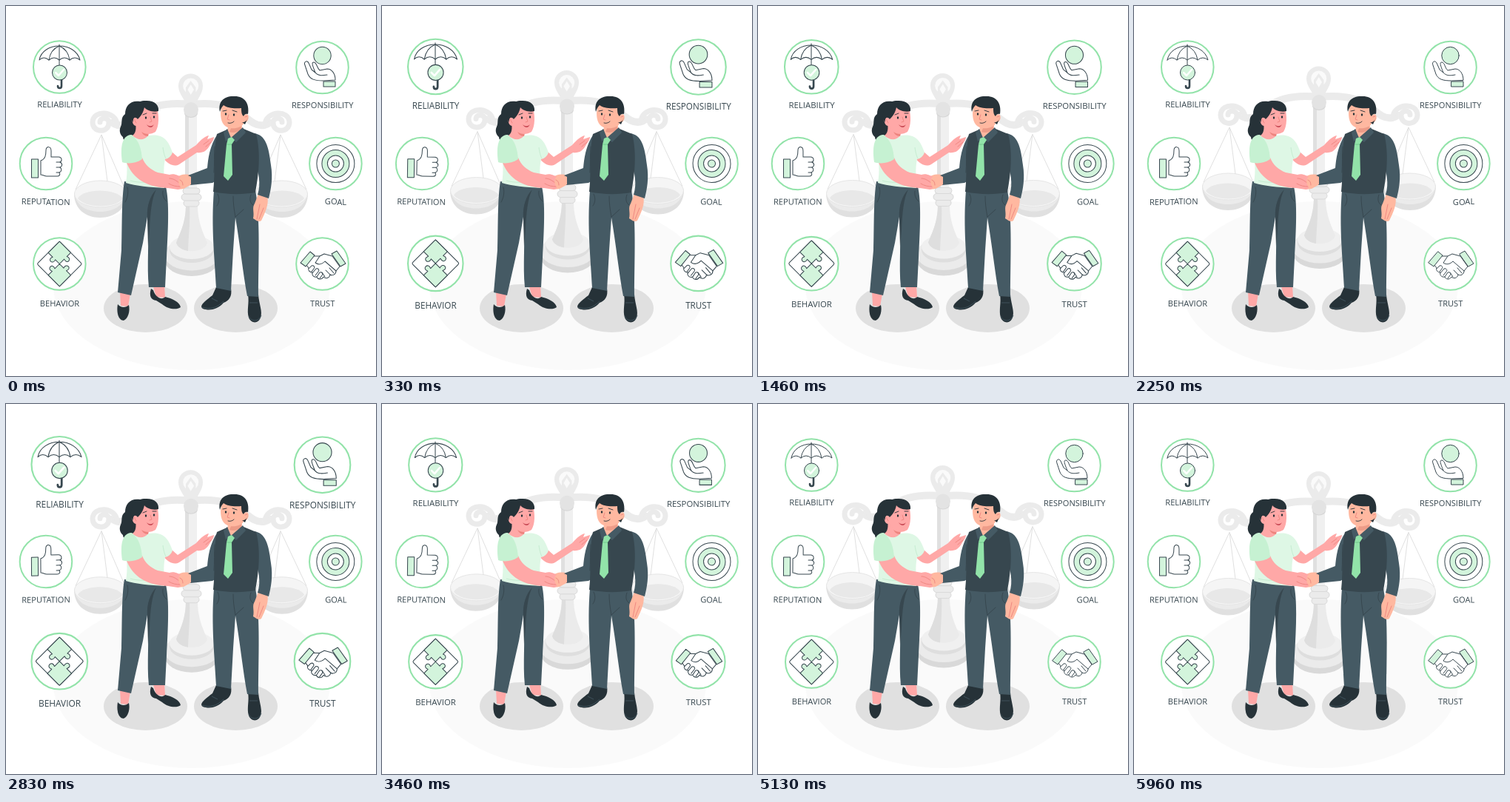
Write an HTML page that moves like this. It is 500 px wide and 500 px high and loops after 6 s.

```html
<!DOCTYPE html>
<html lang="en">
<head>
<meta charset="utf-8">
<title>Trust and values</title>
<style>
  html, body { margin: 0; width: 100%; height: 100%; overflow: hidden; background: #fff; }
  svg { display: block; width: 100%; height: 100%; }
  text { font: 11.1px "Open Sans", "Noto Sans", sans-serif; fill: #37474f; text-anchor: middle; }
  .ring { fill: #fff; stroke: #92e3a9; stroke-width: 2; }
  .icon { fill: none; stroke: #37474f; stroke-width: 1; stroke-linecap: round; stroke-linejoin: round; }
  .tint { fill: #d3f4dc; }
  .white { fill: #fff; }
  .dark { fill: #263238; }
  .slate { fill: #455a64; }
  .deep { fill: #37474f; }
  .rose { fill: #ffa8a7; }
  .peach { fill: #ffb8a0; }
  .line { fill: none; stroke: #263238; stroke-width: .9; stroke-linecap: round; }
  .fold { fill: none; stroke: #37474f; stroke-width: 1; stroke-linecap: round; }
  .blush { fill: none; stroke: #ed847e; stroke-width: .9; stroke-linecap: round; }
</style>
</head>
<body>
<svg viewBox="0 0 500 500" xmlns="http://www.w3.org/2000/svg">
  <defs>
    <g id="arm">
      <path d="M250 133C222 130 198 134 183 145C170 155 163 163 151 161C146 160 143 157 142 153" fill="none" stroke="#ebebeb" stroke-width="10"/>
      <path d="M150 160C149 142 118 139 117 157C117 172 139 172 139 158C139 150 127 150 127 157" fill="none" stroke="#ebebeb" stroke-width="7" stroke-linecap="round"/>
      <path d="M92 253C92 274 107 286 127 286S163 274 163 253Z" fill="#e0e0e0"/>
      <path d="M92 252C94 269 108 278 127 278S160 269 163 252Z" fill="#ebebeb"/>
      <ellipse cx="127.5" cy="254" rx="35" ry="18" fill="#f5f5f5" stroke="#e6e6e6"/>
      <path d="M97 260C105 246 148 246 158 260C148 274 108 274 97 260Z" fill="#e8e8e8"/>
      <path d="M94 248L129 174L161 248M129 174L137 237" fill="none" stroke="#e0e0e0"/>
    </g>
  </defs>

  <ellipse cx="251" cy="378" rx="187" ry="114" fill="#fafafa"/>

  <g id="scales">
    <use href="#arm"/>
    <use href="#arm" transform="matrix(-1 0 0 1 500 0)"/>
    <path d="M243 137C244 126 233 121 233 107.5A16.5 16 0 0 1 266 107.5C266 121 256 126 257 137Z" fill="#ebebeb"/>
    <circle cx="249.7" cy="108" r="10.5" fill="#fafafa"/>
    <path d="M243 128L243 110L249.7 101L256.5 110V128Z" fill="#ebebeb"/>
    <path d="M249.7 106L254 113L249.7 120L245.500 113Z" fill="#fafafa"/>
    <path d="M214 342.500A37 22.500 0 0 0 288 342.500V336H214Z" fill="#d9d9d9"/>
    <ellipse cx="251" cy="336" rx="37" ry="21.500" fill="#ebebeb"/>
    <ellipse cx="251" cy="330" rx="30" ry="17" fill="#dedede"/>
    <ellipse cx="251" cy="326" rx="30" ry="16" fill="#f0f0f0"/>
    <path d="M243 268C243 291 237 303 230 320C234 335 268 335 272 320C265 303 259 291 259 268Z" fill="#ebebeb"/>
    <path d="M243 268C243 291 237 303 230 320C232 327 240 330 246 331C247 306 249 290 248 268Z" fill="#dedede"/>
    <path d="M242 144H258V248H242Z" fill="#f0f0f0"/>
    <path d="M242 144H247V248H242Z" fill="#e0e0e0"/>
    <g fill="#ebebeb" stroke="#d9d9d9">
      <rect x="240" y="262" width="21" height="9" rx="4.500"/>
      <rect x="237" y="254" width="27" height="9" rx="4.500"/>
      <rect x="239" y="246" width="23" height="8" rx="4"/>
    </g>
    <ellipse cx="250" cy="145" rx="9" ry="6" fill="#d6d6d6"/>
    <circle cx="250" cy="140" r="10" fill="#e3e3e3"/>
  </g>

  <g fill="#e0e0e0">
    <ellipse cx="188.500" cy="408.500" rx="56.500" ry="32.500"/>
    <ellipse cx="310.500" cy="408.500" rx="56.500" ry="32.500"/>
  </g>

  <g id="man">
    <path class="dark" d="M284 380L304 382C306 392 301 399 294 401C285 411 274 412 266 409C260 405 270 398 279 391Z"/>
    <path class="dark" d="M327 390H341C342 403 347 413 344 421C341 430 331 429 328 421C325 411 329 402 327 390Z"/>
    <path d="M265 407C275 411 285 408 294 399M328 419C331 427 342 427 345 418M278 395L286 399M329 401H340" fill="none" stroke="#455a64" stroke-width=".8"/>
    <path class="slate" d="M281 249H337C344 290 341 340 341 393L326 392C320 360 316 320 310 286L307 330L304 385L284 381C282 340 277 300 281 249Z"/>
    <path class="fold" d="M310 285C308 274 307 266 307 257M310 285L321 275M286 254C289 260 288 266 285 270M331 255C328 263 331 268 336 270"/>
    <path class="peach" d="M341 254L353 257C356 267 350 280 345 290C341 293 336 288 334 287C336 279 332 273 336 267Z"/>
    <path class="blush" d="M343 268L339 288M348 273L342 288"/>
    <path class="slate" d="M335 172C351 174 355 190 358 215C361 233 358 248 355 260L340 255C345 240 341 225 337 209Z"/>
    <path class="peach" d="M250 229C242 226 235 228 230 232L223 240C226 246 232 249 239 247L251 241Z"/>
    <path class="slate" d="M286 173C275 189 273 207 272 219L246 229C247 234 248 239 249 242L279 239C285 238 287 219 287 205Z"/>
    <path class="deep" d="M285 173L301 166H321L338 173C345 200 341 230 337 252C319 255 299 255 280 251C283 225 280 195 285 173Z"/>
    <path class="fold" stroke="#263238" d="M337 186C337 195 338 203 340 211M282 190C281 201 282 214 281 225"/>
    <path class="peach" d="M301 155H319V169L304 180L299 171Z"/>
    <path d="M304 165C310 164 314 161 317 157L318 166C313 171 307 172 302 170Z" fill="#ed9c88"/>
    <path class="slate" d="M299 166L304 178L297 183L294 171ZM320 164L324 171L311 184L304 178Z"/>
    <path d="M300 179L305 177L309 181L305 187L306 228L300 236L294 230L298 187Z" fill="#92e3a9"/>
    <path d="M298 187L305 187" stroke="#6fc489" stroke-width=".9"/>
    <path class="peach" d="M292 133L320 135L323 147C329 143 330 157 322 158C318 164 311 166 303 165C293 163 290 155 290 144Z"/>
    <path class="dark" d="M289 143C286 129 295 121 309 122C323 122 329 132 327 146C325 145 322 146 321 149C318 147 318 141 318 138C309 139 299 138 294 134C291 137 290 140 289 143Z"/>
    <path class="dark" d="M319 157C323 158 326 154 327 150L323 160Z"/>
    <g class="dark"><ellipse cx="297" cy="146" rx="1.200" ry="1.700"/><ellipse cx="308" cy="147" rx="1.200" ry="1.700"/></g>
    <path class="line" d="M293 142L298 141M306 141L312 143"/>
    <path class="blush" d="M301 147L299 153L302 154M323 150L326 149"/>
    <path class="line" d="M300 158C303 159 306 158 308 156"/>
  </g>

  <g id="woman">
    <path class="dark" d="M181 129C168 127 161 135 161 146C154 151 158 158 155 163C152 169 155 175 158 177C158 183 166 186 172 183C180 181 182 172 178 165L185 142Z"/>
    <path class="rose" d="M154 386L168 389L165 406L155 405ZM198 376H214L215 394L203 393Z"/>
    <path class="dark" d="M151 403C155 408 162 408 166 404C168 412 165 423 159 425C152 425 149 414 151 403Z"/>
    <path class="dark" d="M196 382C193 392 196 397 203 398L211 403C219 410 231 411 236 407C235 400 224 395 215 393C211 398 202 394 199 384Z"/>
    <path class="slate" d="M160 237L216 244C221 265 219 304 217 340L215 380L193 380C190 350 194 320 191 285L185 320L169 391L151 387L156 330C157 300 156 260 160 237Z"/>
    <path class="deep" d="M191 285C190 270 195 256 203 248C197 260 195 278 194 303L192 325Z"/>
    <path class="fold" d="M164 245C166 252 164 260 161 265M212 250C211 257 214 261 217 264"/>
    <path class="rose" d="M212 205L224 197L232 204L257 188C263 181 269 176 274 175L272 180L281 177C281 181 278 184 275 189C271 196 266 199 258 198L234 214C227 218 219 214 212 205Z"/>
    <path class="blush" d="M274 182L267 187M277 184L270 190"/>
    <path d="M169 174C182 179 195 173 205 175C216 177 221 186 225 198C223 203 220 206 215 207C212 220 214 235 214 246C195 245 175 243 162 239C165 222 163 209 161 193Z" fill="#def7e5"/>
    <path d="M212 191C213 198 214 202 216 206M168 236C178 239 192 239 201 236" fill="none" stroke="#c5ecd1"/>
    <path class="rose" d="M162 209L184 205C188 215 195 221 205 225L221 228C227 226 234 229 239 233L244 239C240 242 237 240 233 239C238 243 237 248 232 248L219 246C194 245 171 236 162 209Z"/>
    <path class="blush" d="M221 233C226 233 230 236 234 239M220 240C225 243 230 244 235 244"/>
    <path class="peach" d="M234 233C239 227 245 228 250 231V241L240 247C234 245 232 239 234 233Z"/>
    <path class="blush" d="M235 235C238 236 239 239 239 242"/>
    <path d="M169 174C157 175 154 190 157 211C166 214 177 212 184 207C183 194 180 181 169 174Z" fill="#c6f1d2"/>
    <path class="rose" d="M175 157L193 164L192 175C186 183 177 181 171 175C176 171 176 165 175 157Z"/>
    <path d="M183 169L193 172L192 176C187 176 184 173 183 169Z" fill="#ed847e"/>
    <path class="rose" d="M178 137H204C207 149 207 162 202 170C196 174 188 174 183 170L179 162C170 164 168 151 175 150Z"/>
    <path class="dark" d="M169 150C168 134 179 127 190 128C201 128 207 134 206 142C199 144 190 141 187 137C185 146 181 150 178 153C175 149 171 150 172 158Z"/>
    <g class="dark"><ellipse cx="189" cy="151" rx="1.200" ry="1.700"/><ellipse cx="200" cy="150" rx="1.200" ry="1.700"/></g>
    <path class="line" d="M185 147L190 145M198 145L203 145"/>
    <path class="blush" d="M195 150L197 156L194 157M173 153L176 158"/>
    <path d="M190 160C193 163 197 163 200 160L198 163C196 165 192 164 190 160Z" fill="#c94b55"/>
  </g>

  <g class="pulse" data-pivot="72.3 91.5">
    <circle class="ring" cx="72.300" cy="82.500" r="35.300"/>
    <g class="icon">
      <path class="white" d="M45 73C47 61 59 54 72 54S97 61 100 73Q93 67 86 73Q79 67 72 73Q65 67 58 73Q51 67 45 73Z"/>
      <path d="M72 52V83M72 54Q60 59 58 73M72 54Q84 59 86 73"/>
      <path d="M75 99V108C75 112 70 112 70 108" stroke-width="2.600"/>
      <circle class="tint" cx="72.500" cy="90" r="10"/>
      <path d="M67 90L71 94L78 86" stroke="#fff" stroke-width="2.500"/>
    </g>
    <text x="72.500" y="136.500">RELIABILITY</text>
  </g>

  <g class="pulse" data-pivot="427.6 92.5">
    <circle class="ring" cx="427.500" cy="83" r="35.300"/>
    <g class="icon">
      <circle class="tint" cx="427.500" cy="67" r="11.700"/>
      <path class="white" d="M429 101C417 101 411 99 408 92L404 80C402 75 407 73 409 77L413 86L418 90C415 82 412 76 416 76C420 76 420 84 424 87L434 85C440 85 445 91 445 100Z"/>
      <path d="M418 90C422 95 428 94 434 93"/>
      <rect class="tint" x="429" y="102" width="16" height="7"/>
    </g>
    <text x="427.700" y="137.500">RESPONSIBILITY</text>
  </g>

  <g class="sway" data-pivot="54 223">
    <circle class="ring" cx="54" cy="213" r="35.300"/>
    <g class="icon">
      <rect class="tint" x="34.500" y="207" width="9" height="25"/>
      <path class="white" d="M47 209C53 207 54 202 54 195C54 189 61 189 61 196V204H71C76 204 76 210 73 211C77 213 76 217 73 218C76 220 75 224 72 225C74 228 72 230 69 230H55C52 230 50 228 47 228Z"/>
      <path d="M68 211H73M68 218H73M68 225H72"/>
    </g>
    <text x="53.700" y="268.500">REPUTATION</text>
  </g>

  <g class="sway" data-pivot="445.5 223">
    <circle class="ring" cx="445.400" cy="213" r="35.300"/>
    <g class="icon">
      <circle class="white" cx="445.400" cy="213" r="25.500"/>
      <circle class="tint" cx="445.400" cy="213" r="18.500"/>
      <circle class="white" cx="445.400" cy="213" r="11"/>
      <circle class="tint" cx="445.400" cy="213" r="5"/>
    </g>
    <text x="445.500" y="268.500">GOAL</text>
  </g>

  <g class="pulse" data-pivot="72.3 359.5">
    <circle class="ring" cx="72.300" cy="348.500" r="35.300"/>
    <g class="icon" transform="translate(72.300 348.500) rotate(45)">
      <rect class="white" x="-21.500" y="-21.500" width="43" height="43" rx="2"/>
      <path class="tint" d="M-21.500 -21.500H0V-14C7 -18 9 -6 0 -9V0H-8C-5 8 -17 8 -13 0H-21.500Z"/>
      <path class="tint" d="M0 0H8C5 -8 17 -8 13 0H21.500V21.500H0V14C-8 18 -8 5 0 9Z"/>
    </g>
    <text x="72.500" y="406">BEHAVIOR</text>
  </g>

  <g class="pulse" data-pivot="427.6 359.5">
    <circle class="ring" cx="427.500" cy="348.500" r="35.300"/>
    <g class="icon">
      <path class="white" d="M413 338L424 338L430 335L441 338L451 352L446 358C446 363 441 365 438 363C437 368 432 369 429 366C426 371 421 369 420 366C415 367 413 363 414 360C410 360 408 357 409 354L406 350Z"/>
      <path class="white" d="M424 338L418 347C422 350 427 349 431 345L446 358M437 354L443 361M432 357L438 363M427 360L431 366"/>
      <path class="white" d="M409 355L413 351C416 350 418 353 416 355L413 359M414 361L419 355C422 354 424 357 422 359L418 364M420 366L424 360C427 359 429 362 427 364L424 368"/>
      <path class="tint" d="M411 332L417 337L405 352L398 347ZM440 335L447 331L459 348L452 352Z"/>
    </g>
    <text x="427.700" y="406">TRUST</text>
  </g>
</svg>
<script>
  const LOOP = 6000, CYCLE = 1500;
  const scales = document.getElementById('scales');
  const collect = selector => [...document.querySelectorAll(selector)].map(node => ({
    node, pivot: node.dataset.pivot.split(' ').map(Number)
  }));
  const pulsing = collect('.pulse');
  const swaying = collect('.sway');

  // Linear interpolation through [position, value] stops.
  function track(stops, p) {
    const i = Math.max(1, stops.findIndex(([at]) => at >= p));
    const [[p0, v0], [p1, v1]] = [stops[i - 1], stops[i]];
    return v0 + (v1 - v0) * (p - p0) / (p1 - p0);
  }

  const FLOAT = [[0, 0], [.5, -10], [1, 0]];
  const SWAY = [[0, 0], [.25, 1], [.75, -1], [1, 0]];
  const BEAT = [[0, 1], [.1, 1.1], [.3, 1], [.4, 1], [.5, 1.1], [.6, 1], [1, 1]];

  function draw(time) {
    const cycle = time % CYCLE / CYCLE;
    const beat = track(BEAT, time % LOOP / LOOP);
    const angle = track(SWAY, cycle);
    scales.setAttribute('transform', `translate(0 ${track(FLOAT, cycle)})`);
    for (const { node, pivot: [x, y] } of pulsing)
      node.setAttribute('transform', `translate(${x} ${y}) scale(${beat}) translate(${-x} ${-y})`);
    for (const { node, pivot: [x, y] } of swaying)
      node.setAttribute('transform', `rotate(${angle} ${x} ${y})`);
  }

  const start = performance.now();
  function tick() {
    draw(performance.now() - start);
    requestAnimationFrame(tick);
  }
  draw(0);
  requestAnimationFrame(tick);
</script>
</body>
</html>
```
